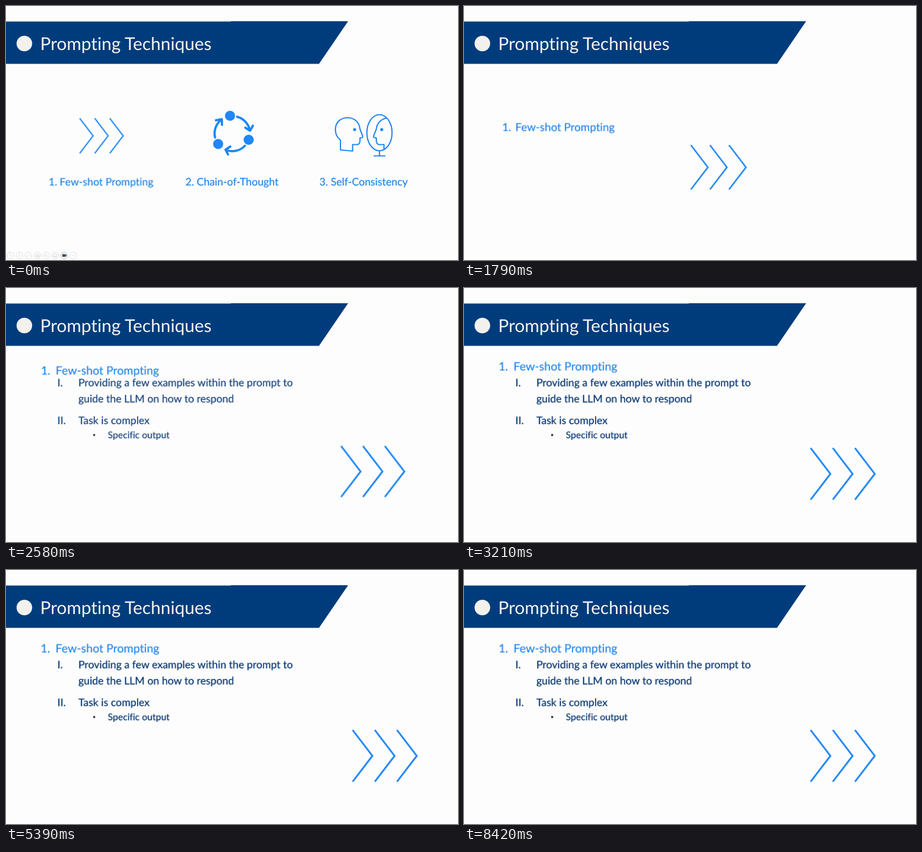
Write an HTML page that moves like this. It is 800 px wide and 450 px high and loops after 8.45 s.

```html
<!DOCTYPE html>
<html lang="en">
<head>
<meta charset="utf-8">
<title>Prompting Techniques</title>
<style>
  html, body { margin: 0; width: 100%; height: 100%; overflow: hidden; background: #fefdfe; }
  svg { display: block; width: 100vw; height: 100vh; }
  text { font-family: Lato, "Open Sans", sans-serif; text-rendering: geometricPrecision; font-variant-ligatures: none; }
  .line { fill: none; stroke: #1e86f5; stroke-width: 2.15; }
  .blue { fill: #1e88f8; }
  .label { fill: #1f84ea; stroke: #1f84ea; stroke-width: .2; font-size: 18.6px; }
  .mid { text-anchor: middle; }
  .note { fill: #003470; stroke: #003470; stroke-width: .25; font-size: 18.6px; }
  .small { font-size: 16.5px; }
  #bar { fill: none; stroke: #dcdcdd; }
</style>
</head>
<body>
<svg viewBox="0 0 800 450">
  <path fill="#003c7c" d="M0 27.5H398V27H605.5L554 102.5H0Z"/>
  <circle cx="32.5" cy="66.5" r="13.8" fill="#f2f1ed"/>
  <text x="60.5" y="77.5" font-size="31.3" fill="#f5f4f2">Prompting Techniques</text>

  <g id="others">
    <g class="line" stroke-linecap="round" stroke-linejoin="round" style="stroke-width:4">
      <path d="M409 196.3A31 31 0 0 1 431.5 220M423.5 215.5L432 221L437 212"/>
      <path d="M423 247.5A31 31 0 0 1 389 255M397 249L388.5 254.5L393 263"/>
      <path d="M370 233A31 31 0 0 1 381 201.5M371.5 202.5L382 200.5L382.3 210.5"/>
    </g>
    <g class="blue">
      <circle cx="396.5" cy="194.5" r="9"/>
      <circle cx="429.5" cy="237" r="9"/>
      <circle cx="375.5" cy="244.5" r="9"/>
      <circle cx="617" cy="219" r="2.7"/>
      <circle cx="665" cy="219" r="2.7"/>
    </g>
    <g class="line" stroke-linejoin="round">
      <path d="M592 255V237.5C585.5 232.5 583 226 583 219C583 206 592 198 604.5 198C617 198 625.5 206 626.5 218L631.3 230.5Q632.5 233.8 626.5 233.8V239.5Q626 246 620 245.5L613.5 245.5V257Z"/>
      <ellipse cx="661" cy="224.5" rx="22.3" ry="32"/>
      <path d="M674 198.5C663 200.5 656.5 208 655.5 218L650.5 230.5Q649.5 233.8 655.5 233.8V239.5Q656 246 662 245.5L669 245.5V254"/>
      <path d="M661 256.5V265.5M650.5 265.5H671.5"/>
    </g>
    <text class="label mid" x="400" y="318">2. Chain-of-Thought</text>
    <text class="label mid" x="633" y="318">3. Self-Consistency</text>
  </g>

  <g id="arrows" class="line">
    <path d="M0 0L23.7 31L0 62M26.6 0L50.3 31L26.6 62M53.2 0L76.9 31L53.2 62"/>
  </g>

  <g id="notes" class="note">
    <g id="first">
      <text x="91" y="174.5">I.</text>
      <text x="128" y="174.5">Providing a few examples within the prompt to</text>
      <text x="128" y="202.5">guide the LLM on how to respond</text>
    </g>
    <g id="second">
      <text x="91" y="241">II.</text>
      <text x="128" y="241">Task is complex</text>
    </g>
    <g id="third">
      <circle cx="156" cy="260.5" r="1.9" fill="#222" stroke="none"/>
      <text class="small" x="180.3" y="266">Specific output</text>
    </g>
  </g>

  <g id="head" class="label">
    <text id="num">1.</text>
    <text id="topic">Few-shot Prompting</text>
  </g>

  <g id="bar">
    <path d="M9.5 439.5L7 442L9.5 444.5M22.5 439.5L25 442L22.5 444.5M37 444.5L42 439.5M53 440H57V444H53ZM55 442H59V445H55ZM72 443L74 445M84 439.5H90V444.5H84ZM84 443H90M116 442H121"/>
    <circle cx="70.5" cy="441.5" r="2"/>
    <path d="M100 440H104.5V444H100ZM104.5 442L106.5 440V444Z" fill="#405060" stroke="#405060"/>
  </g>
</svg>
<script>
  const LOOP = 8450, START = 940, END = 2998, PULSE = 500;
  const GLIDE = 'cubic-bezier(.275, 0, .4, 1)';
  const $ = id => document.getElementById(id);

  // steps: [time, value, easing to the next step]
  function play(id, prop, steps) {
    const all = [[0, steps[0][1]], ...steps, [LOOP, steps[steps.length - 1][1]]];
    const frames = all.map(([time, value, easing = 'linear']) =>
      ({ offset: time / LOOP, [prop]: value, easing }));
    $(id).animate(frames, { duration: LOOP, iterations: Infinity });
  }

  function glide(id, from, to) {
    const place = ([x, y, s]) => `translate(${x}px, ${y}px) scale(${s})`;
    play(id, 'transform', [[START, place(from), GLIDE], [END, place(to)]]);
  }

  function pulse(id, start, x, y) {
    $(id).style.transformOrigin = `${x}px ${y}px`;
    const at = part => start + part * PULSE;
    play(id, 'transform', [[start, 'scale(1)'], [at(.5), 'scale(1.05)'], [at(1), 'scale(1)']]);
    play(id, 'opacity', [[start, 1], [at(.2), .5], [at(.8), .5], [at(1), 1]]);
  }

  for (let i = 0; i < 8; i++) {
    const ring = document.createElementNS('http://www.w3.org/2000/svg', 'circle');
    const look = { cx: 8 + i * 15.8, cy: 442, r: 6, stroke: i === 6 ? '#b4bcc2' : '#dcdcdd' };
    for (const key in look) ring.setAttribute(key, look[key]);
    $('bar').append(ring);
  }

  glide('arrows', [130.5, 199, 1], [613.5, 283.5, 1.476]);
  glide('num', [75.5, 318, 1], [61.3, 146, 1.107]);
  glide('topic', [95, 318, 1], [87.7, 146, 1.107]);

  play('bar', 'opacity', [[START, 1], [START, 0]]);
  play('others', 'opacity', [[START, 1], [1660, 0]]);
  play('notes', 'opacity', [[1800, 0], [2650, 1]]);

  pulse('head', 4000, 166.5, 140);
  pulse('first', 4850, 301, 183);
  pulse('second', 5820, 173.5, 235);
  pulse('third', 6850, 221.5, 261);
</script>
</body>
</html>
```
